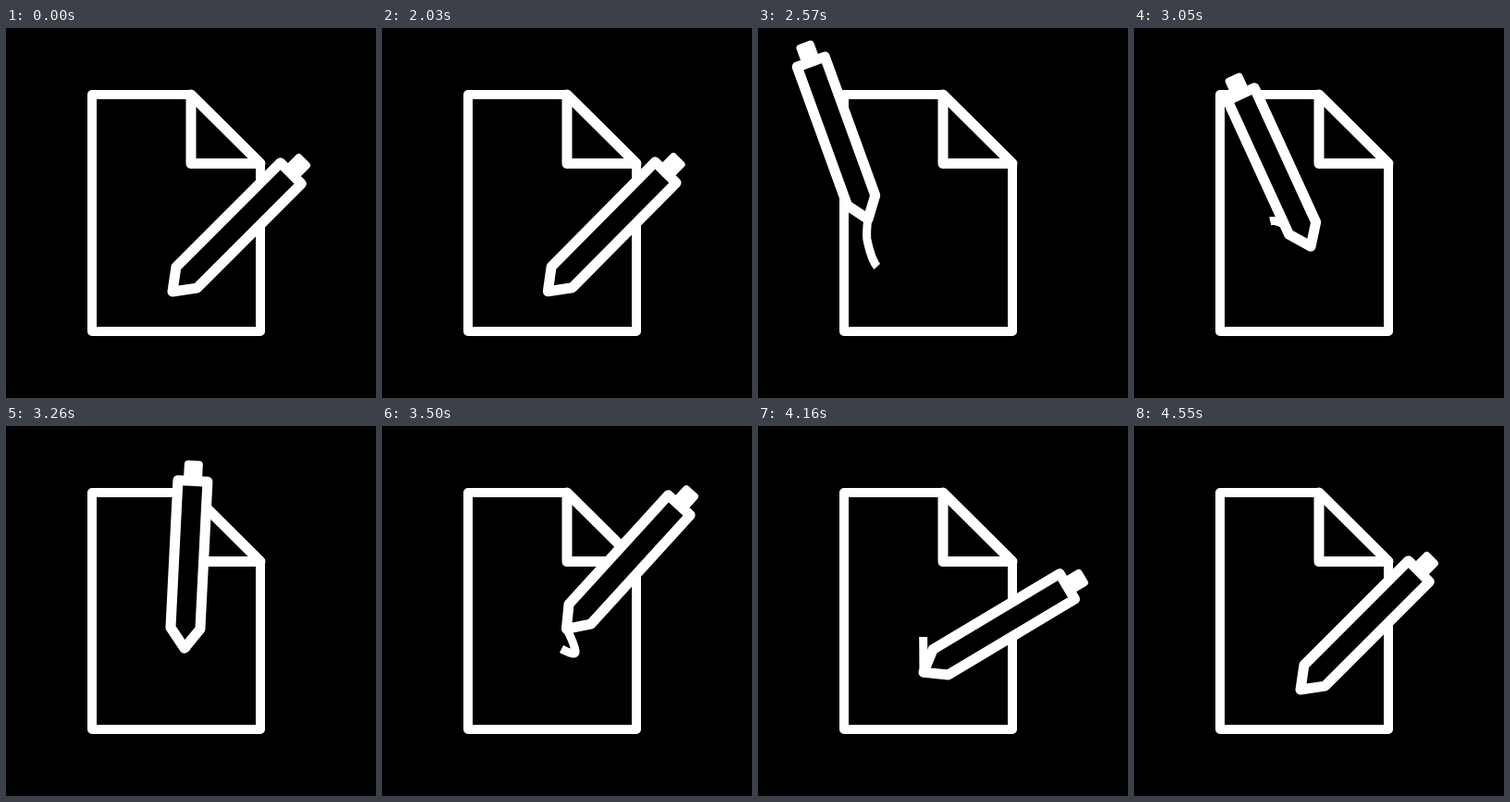
Animation, 400 px wide and 400 px high, one loop 4.64 s. Source, as an HTML page with a canvas:

```html
<!DOCTYPE html>
<html lang="en">
<head>
<meta charset="utf-8">
<title>Writing pen</title>
<style>
  html, body { margin: 0; width: 100%; height: 100%; overflow: hidden; background: #000; }
  canvas { display: block; width: 400px; height: 400px; }
</style>
</head>
<body>
<canvas id="stage" width="400" height="400"></canvas>
<script>
const ctx = document.getElementById('stage').getContext('2d');
const LOOP = 4640, INK_START = 2390, INK_END = 4300, INK_LIFE = 180;

// Turning points of the pen tip
const path = [
  { t: 2000, x: 180, y: 285 },
  { t: 2390, x: 129, y: 258 },
  { t: 2500, x: 118, y: 229 },
  { t: 2570, x: 119, y: 206.5 },
  { t: 2720, x: 118, y: 262 },
  { t: 2870, x: 147, y: 209 },
  { t: 3050, x: 191, y: 236 },
  { t: 3320, x: 194, y: 241 },
  { t: 3410, x: 209, y: 245 },
  { t: 3500, x: 199.5, y: 219.5 },
  { t: 3710, x: 174, y: 190 },
  { t: 3890, x: 178, y: 209 },
  { t: 4175, x: 179, y: 268 },
  { t: 4550, x: 180, y: 285 }
];
const last = path.length - 1;

function slope(i, axis) {
  if (i === 0 || i === last) return 0;
  const a = path[i - 1], b = path[i + 1];
  return (b[axis] - a[axis]) / (b.t - a.t);
}

// Smooth curve through the turning points
function tip(t) {
  t = Math.min(Math.max(t, path[0].t), path[last].t - 0.01);
  const i = path.findIndex(p => p.t > t) - 1;
  const a = path[i], b = path[i + 1], d = b.t - a.t, s = (t - a.t) / d;
  const blend = s * s * (3 - 2 * s);
  return ['x', 'y'].map(axis =>
    a[axis] + (b[axis] - a[axis]) * blend +
    d * s * (1 - s) * ((1 - s) * slope(i, axis) - s * slope(i + 1, axis)));
}

function ease(t, from, to) {
  const s = Math.min(Math.max((t - from) / (to - from), 0), 1);
  return (1 - Math.cos(Math.PI * s)) / 2;
}

// Degrees from vertical: swing left, swing right, settle
function tilt(t) {
  return 45 - 75 * ease(t, 2000, 2750) + 91 * ease(t, 2922, 3748) - 16 * ease(t, 4050, 4550);
}

function trace(points, closed) {
  ctx.beginPath();
  for (const [x, y] of points) ctx.lineTo(x, y);
  if (closed) ctx.closePath();
}

function drawPage() {
  ctx.lineWidth = 10;
  trace([[200, 72], [93, 72], [93, 328], [275, 328], [275, 147]], false);
  ctx.stroke();
  ctx.lineWidth = 11;
  trace([[200, 72], [275, 146.5], [200, 146.5]], true);
  ctx.stroke();
}

function drawInk(t) {
  const from = Math.max(INK_START, t - INK_LIFE), to = Math.min(t, INK_END);
  if (from >= to) return;
  const points = [];
  for (let s = from; s < to; s += 6) points.push(tip(s));
  points.push(tip(to));
  ctx.lineWidth = 9;
  trace(points, false);
  ctx.stroke();
}

function drawPen(t) {
  ctx.save();
  ctx.translate(...tip(t));
  ctx.rotate(tilt(t) * Math.PI / 180);
  ctx.lineWidth = 11;
  ctx.fillStyle = '#000';
  trace([[0, 0], [-16, -21.5], [-16, -181], [16, -181], [16, -21.5]], true);
  ctx.fill();
  ctx.stroke();
  ctx.lineWidth = 8;
  ctx.fillStyle = '#fff';
  trace([[-6, -181], [-6, -199], [6, -199], [6, -181]], true);
  ctx.fill();
  ctx.stroke();
  ctx.restore();
}

function render() {
  const t = performance.now() % LOOP;
  ctx.fillStyle = '#000';
  ctx.fillRect(0, 0, 400, 400);
  ctx.strokeStyle = '#fff';
  ctx.lineJoin = 'round';
  drawPage();
  drawInk(t);
  drawPen(t);
  requestAnimationFrame(render);
}
render();
</script>
</body>
</html>
```
